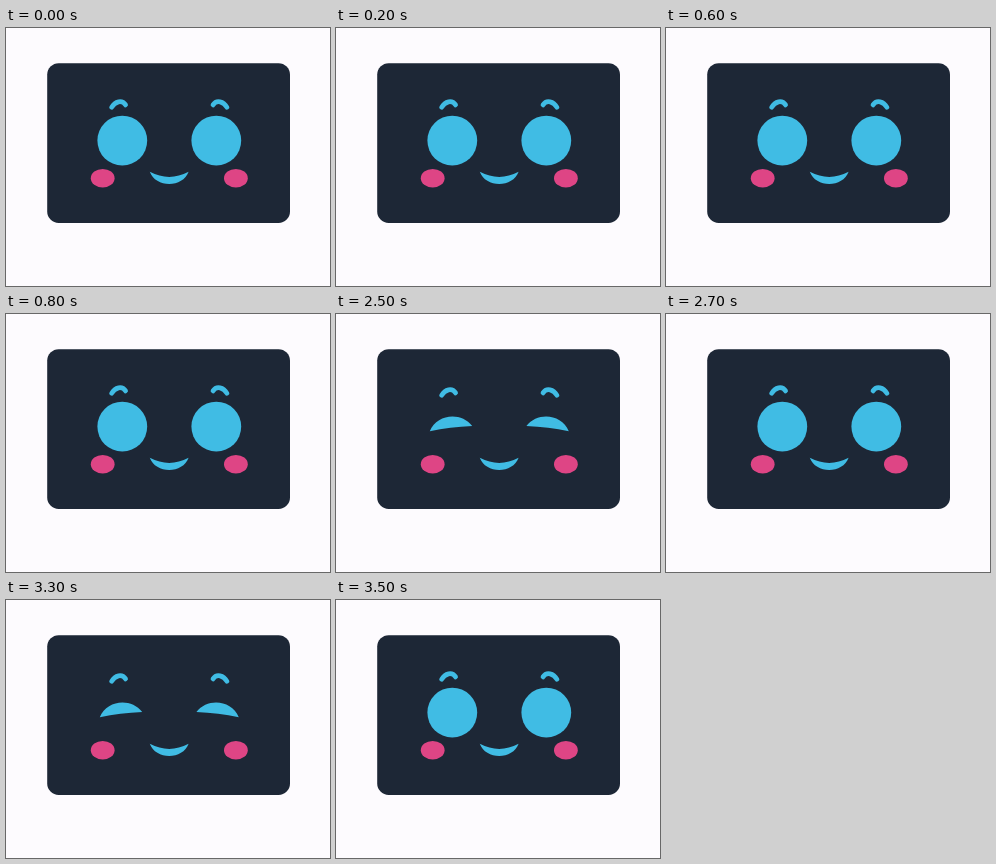
Animation, 324 px wide and 258 px high, one loop 5.5 s. Source, as an HTML page with a canvas:

```html
<!DOCTYPE html>
<html lang="en">
<head>
<meta charset="utf-8">
<title>Blinking face</title>
<style>
  html, body { margin: 0; width: 100%; height: 100%; overflow: hidden; background: #fdfbfe; }
  canvas { display: block; width: 324px; height: 258px; }
</style>
</head>
<body>
<canvas id="stage"></canvas>
<script>
const W = 324, H = 258, LOOP = 5500;
const BLINKS = [[2500, 2700], [3000, 3500]];
const MID = 163.3; // axis of the face
const PAPER = '#fdfbfe', CARD = '#1d2736', CYAN = '#40bce4', PINK = '#de4585';

const canvas = document.getElementById('stage');
const ctx = canvas.getContext('2d');
const dpr = window.devicePixelRatio || 1;
canvas.width = W * dpr;
canvas.height = H * dpr;
ctx.scale(dpr, dpr);

function ellipse(x, y, rx, ry, color) {
  ctx.fillStyle = color;
  ctx.beginPath();
  ctx.ellipse(x, y, rx, ry, 0, 0, Math.PI * 2);
  ctx.fill();
}

function fillPath(d, color) {
  ctx.fillStyle = color;
  ctx.fill(new Path2D(d));
}

function drawBrow(drop) {
  ctx.save();
  ctx.translate(0, drop);
  ctx.strokeStyle = CYAN;
  ctx.lineWidth = 4.7;
  ctx.lineCap = 'round';
  ctx.stroke(new Path2D('M105.6 79.3C109 73.4 116 71.4 119.6 76.9'));
  ctx.restore();
}

function drawHalf(closed) {
  drawBrow(closed ? 2 : 0);
  if (closed) {
    fillPath('M93.8 117.2C101 99.9 125 97.6 136.2 111.9Q114 112.7 93.8 117.2Z', CYAN);
  } else {
    ellipse(116.3, 112.6, 24.9, 24.9, CYAN);
  }
  ellipse(96.7, 150.2, 11.9, 9.3, PINK);
}

function draw(closed) {
  ctx.fillStyle = PAPER;
  ctx.fillRect(0, 0, W, H);

  ctx.fillStyle = CARD;
  ctx.beginPath();
  ctx.roundRect(41.2, 35.2, 242.8, 159.7, 11.5);
  ctx.fill();

  drawHalf(closed);
  ctx.save();
  ctx.translate(MID * 2, 0);
  ctx.scale(-1, 1);
  drawHalf(closed);
  ctx.restore();

  fillPath('M143.8 143.8Q163.2 154 182.6 143.8C177 160 149.4 160 143.8 143.8Z', CYAN);
}

const start = performance.now();

function tick() {
  const t = (performance.now() - start) % LOOP;
  draw(BLINKS.some(([from, to]) => t >= from && t < to));
  requestAnimationFrame(tick);
}

tick();
</script>
</body>
</html>
```
